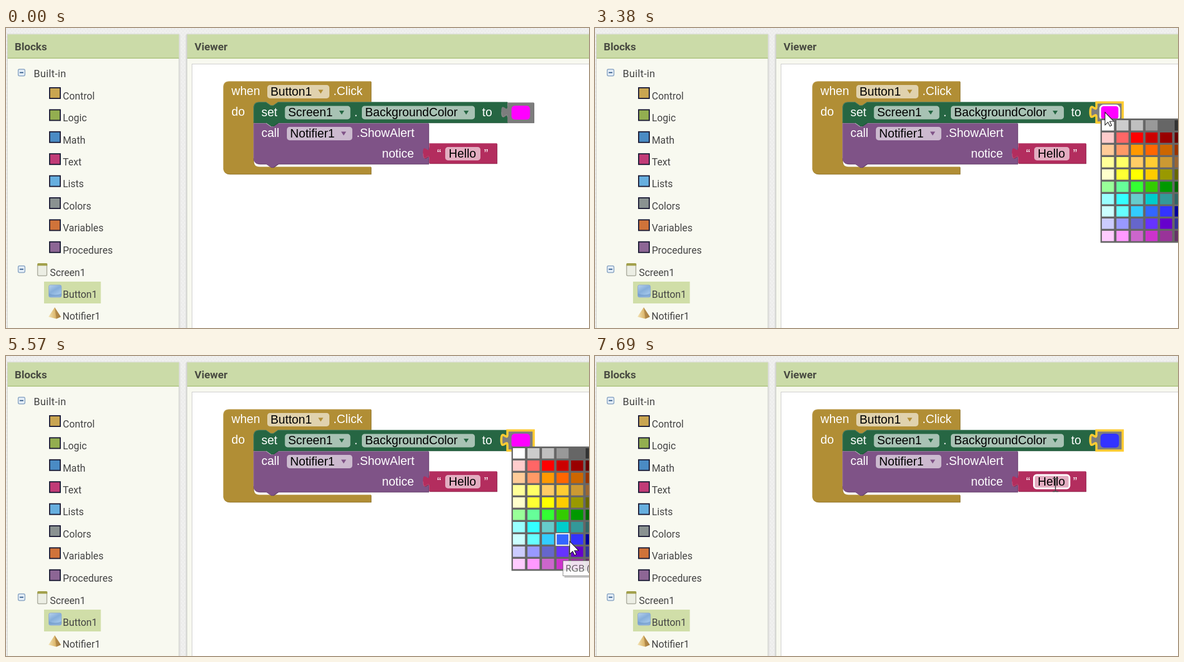
An HTML page that plays this animation: 1042x537 px, repeating every 8 s.

```html
<!DOCTYPE html>
<html lang="en">
<head>
<meta charset="utf-8">
<title>Blocks editor</title>
<style>
  html, body { margin: 0; width: 100%; height: 100%; overflow: hidden; background: #f0f0ee; }
  svg { display: block; width: 100%; height: 100%; }
  text { white-space: pre; }
  .tree { font: 17.6px Roboto, sans-serif; fill: #444; }
  .root { font-size: 18.2px; letter-spacing: .3px; }
  .head { font: bold 19px Roboto, sans-serif; fill: #494b42; }
  .code { font: 21.4px "Liberation Sans", Arial, sans-serif; fill: #fff; }
  .code .dark { fill: #000; }
  .tip { font: 17px "Open Sans", sans-serif; fill: #575757; }
  .light { fill: none; stroke: #fff; stroke-opacity: .2; }
</style>
</head>
<body>
<svg id="stage" viewBox="0 0 1042 537" preserveAspectRatio="none">
  <defs>
    <pattern id="weave" width="6" height="7" patternUnits="userSpaceOnUse">
      <rect width="6" height="7" fill="#f0f0ef"/>
      <path d="M1.5 0v4M4.5 3v4" stroke="#e7e7e6"/>
    </pattern>
    <linearGradient id="glass" x2="0.6" y2="1">
      <stop offset="0" stop-color="#b8d2ee"/><stop offset=".5" stop-color="#86aeda"/><stop offset="1" stop-color="#a9cbed"/>
    </linearGradient>
    <linearGradient id="gold">
      <stop offset="0" stop-color="#f3e3b4"/><stop offset=".55" stop-color="#dcb76c"/><stop offset="1" stop-color="#a97f3c"/>
    </linearGradient>
    <g id="toggle">
      <rect x=".8" y=".8" width="12" height="12" rx="2.5" fill="#e3edf7" stroke="#8ba6c4" stroke-width="1.5"/>
      <path d="M3.5 6.8h6.6" stroke="#3f6591" stroke-width="2"/>
    </g>
  </defs>

  <rect width="1042" height="537" fill="url(#weave)"/>
  <g stroke="#cfd1cb">
    <rect x="2.5" y="11" width="306.5" height="540" fill="#f8f9f0"/>
    <rect x="323.5" y="11" width="740" height="540" fill="#f8f9f0"/>
  </g>
  <path d="M310.5 12V537M322 12V537" stroke="#dcdcda" stroke-width="2"/>
  <path d="M3 11.5H309V54H3zM324 11.5H1042V54H324z" fill="#cbdba8"/>
  <path d="M3 54H309M324 54H1042" stroke="#a9c17a" stroke-width="1.3"/>
  <rect x="332.5" y="64.5" width="730" height="500" fill="#fff" stroke="#ccc"/>
  <g class="head"><text x="15.5" y="40.3">Blocks</text><text x="337" y="40.3">Viewer</text></g>

  <g id="tree" class="tree">
    <rect x="68" y="454" width="101.5" height="39" fill="#d0dea8"/>
    <use href="#toggle" x="21" y="73"/>
    <use href="#toggle" x="21" y="425"/>
    <text class="root" x="49.5" y="87.5">Built-in</text>
    <text x="78.5" y="443.5">Screen1</text>
    <text x="101.5" y="482.5">Button1</text>
    <text x="101" y="521.5">Notifier1</text>
    <rect x="56.5" y="422" width="16.5" height="21.5" rx="2" fill="#eceee4" stroke="#a9aa9c" stroke-width="1.5"/>
    <path d="M56 425.5V423q0-2 2-2H72q2 0 2 2v2.5z" fill="#a2a04b"/>
    <rect x="76.5" y="460" width="22.5" height="22" rx="3" fill="url(#glass)" stroke="#8faacb"/>
    <path d="M77 475q11 5 22 0v4q0 2-2 2H79q-2 0-2-2z" fill="#6f98c9" opacity=".65"/>
    <path d="M87 500L98 517 90 520.5 76 517z" fill="url(#gold)"/>
    <path d="M87 500L90 520.5 98 517z" fill="#a57c40" opacity=".7"/>
  </g>

  <g id="blocks" transform="translate(-.8 -.8)"></g>

  <g id="code" class="code">
    <rect id="color" x="903.5" y="139" width="33" height="25" rx="6"/>
    <rect id="hello" x="785" y="213" width="63" height="24" rx="5" fill="#e3adc1"/>
  </g>
  <rect id="colorRing" x="903" y="138.5" width="34" height="26" rx="6" fill="none" stroke="#fff" stroke-width="3"/>
  <rect id="helloRing" x="784.5" y="213" width="63.5" height="24" rx="5" fill="none" stroke="#fff" stroke-width="3"/>

  <g id="picker">
    <rect x="903.5" y="162" width="184" height="222.5" fill="#666"/>
    <g id="cells"></g>
    <rect id="cellRing" width="23" height="20.5" fill="none" stroke="#fff" stroke-width="2"/>
  </g>
  <g id="tip">
    <path d="M998 369H1060V397H998z" fill="#000" opacity=".25"/>
    <rect x="995.5" y="366.5" width="150" height="27" fill="#fff" stroke="#777"/>
    <text class="tip" x="1000" y="386">RGB (102, 51, 255)</text>
  </g>
  <path id="arrow" d="M.5.8V23.6L5.8 18.6 9.3 25.7 12.4 24.3 9 17.3 16.3 17z" fill="#fff" stroke="#1b1b1b" stroke-width="1.1"/>
  <path id="beam" d="M-5-9h3.5q1.5 0 1.5 1.5 0-1.5 1.5-1.5H5M0-7.500V13M-5 14.500h3.5q1.5 0 1.5-1.5 0 1.5 1.5 1.5H5" fill="none" stroke="#494949" stroke-width="1.7"/>
</svg>

<script>
const $ = id => document.getElementById(id);

function add(parent, tag, attrs, text = '') {
  const el = document.createElementNS('http://www.w3.org/2000/svg', tag);
  for (const k in attrs) el.setAttribute(k, attrs[k]);
  el.textContent = text;
  return parent.appendChild(el);
}

// Toolbox drawers
const drawers = {
  Control: '#c9a551', Logic: '#93ae50', Math: '#4a8bc4', Text: '#c13b77',
  Lists: '#67afdf', Colors: '#8a9291', Variables: '#d0733a', Procedures: '#8d6695'
};
Object.entries(drawers).forEach(([name, fill], i) => {
  const y = 107 + i * 39.4;
  add($('tree'), 'rect', { x: 78, y, width: 19, height: 19, fill, stroke: '#1b1b35', 'stroke-width': 2 });
  add($('tree'), 'text', { x: 101.5, y: y + 20.8 }, name);
});

// Blocks: notch runs left to right, bump right to left, plug is the value tab
const notch = 'l8.5 6h4.5l8.5-6';
const bump = 'l-8.5 6h-4.5l-8.5-6';
const plug = 'c0-13.5-11 11-11-10s11 3.4 11-10';
const colorPath = `M897 134H944V170H897V161${plug}z`;

function block(d, fill, dark, light) {
  add($('blocks'), 'path', { d, fill: dark, transform: 'translate(1 1)' });
  add($('blocks'), 'path', { d, fill });
  add($('blocks'), 'path', { d: light, class: 'light' });
}
block(`M400 96H653V133H487${bump}H454q-11 0-11 11V238q0 11 11 11H653V262H400q-11 0-11-11V107q0-11 11-11z`,
  '#b18e35', '#8e722a', 'M389.5 252V107q0-10.5 10.5-10.5H652M446 246q3 3.5 8 3.5H652');
block(`M454 171H465.5${notch}H756V244H487${bump}H454q-11 0-11-11V171z`,
  '#7f5387', '#66426c', `M443.500 234V171.5H465.5${notch}H755`);
block(`M454 133H465.5${notch}H897V170H487${bump}H443V144q0-11 11-11z`,
  '#266643', '#1e5236', `M443.5 169V144q0-10.5 10.5-10.5H465.5${notch}H896`);
block(colorPath, '#7d7d7d', '#646464', 'M897.5 141V134.5H943M897 160.5c0-13-10.5 11-10.5-9');
block(`M757 207H878V243H757V235${plug}z`, '#b32d5e', '#8f244b',
  'M757.5 214V207.5H877M757 234.5c0-13-10.5 11-10.5-9');
const outline = add($('blocks'), 'path', {
  d: colorPath, fill: 'none', stroke: '#fc3', 'stroke-width': 4, 'stroke-linejoin': 'miter'
});

function label(x, y, str, cls = '') {
  add($('code'), 'text', { x, y, class: cls }, str);
}
function dropdown(x, y, w, str, fill, arrow) {
  add($('code'), 'rect', { x, y, width: w, height: 24, rx: 5, fill });
  label(x + 5.8, y + 18.6, str, 'dark');
  add($('code'), 'path', { d: `M${x + w - 20} ${y + 8.5}h9l-4.5 7z`, fill: arrow });
}
dropdown(467, 102, 111, 'Button1', '#e0d2ae', '#b18e35');
dropdown(498.5, 139.5, 117, 'Screen1', '#a8c2b4', '#266643');
dropdown(636, 139.5, 202, 'BackgroundColor', '#a8c2b4', '#266643');
dropdown(502, 177, 117, 'Notifier1', '#ccbacf', '#7f5387');
label(403, 120.3, 'when');
label(585, 120.3, '.Click');
label(403, 157, 'do');
label(456.5, 158, 'set');
label(622.5, 158, '.');
label(851, 158, 'to');
label(456.5, 195.3, 'call');
label(626.5, 195.3, '.ShowAlert');
label(672, 231.8, 'notice');
label(770.5, 231.8, '“');
label(854.5, 231.8, '”');
label(791.3, 231.8, 'Hello', 'dark');

// Colour picker
const palette = [
  'fff ccc c0c0c0 999 666 333', 'fcc f66 f00 c00 900 600', 'fc9 f96 f90 f60 c60 930',
  'ff9 ff6 fc6 fc3 c93 963', 'ffc ff3 ff0 fc0 990 660', '9f9 6f9 3f3 3c0 090 060',
  '9ff 3ff 6cc 0cc 399 366', 'cff 6ff 3cf 36f 33f 009', 'ccf 99f 66c 63f 60c 339',
  'fcf f9f c6c c3c 939 636'
];
palette.forEach((row, r) => row.split(' ').forEach((hex, c) =>
  add($('cells'), 'rect', { x: 906 + c * 26, y: 165 + r * 22, width: 21.5, height: 18.5, fill: '#' + hex })));

// Pointer: [start ms, first points], one point every 80 ms, then it rests
const moves = [
  [640, [915, 514], [866, 382], [850, 332]],
  [1810, [850.5, 304.5], [848, 264], [862, 212], [890, 168], [905, 150]],
  [2520, [907, 150], [910, 150]],
  [2750, [911, 150]],
  [4310, [914, 159], [926, 188], [948, 238], [969, 290], [983, 325], [990, 341], [991, 344]],
  [5410, [994, 342], [1001, 336], [1007, 331], [1009, 331], [1010, 331]],
  [5900, [1013, 331]],
  [7060, [1004, 326], [974, 309], [932, 283], [892, 258], [860, 240], [841, 232], [831, 229], [825, 228], [823, 228]]
];
const OPEN = 3380, CLOSE = 6430, LOOP = 8000;

function pointer(t) {
  const move = moves.findLast(m => m[0] <= t);
  if (!move) return null;
  const [start, ...points] = move;
  // The last step may fall a little short of its 80 ms
  return points[Math.min(points.length - 1, Math.floor((t - start + 20) / 80))];
}

function tipAlpha(t) {
  if (t < 5090 || t >= 5810) return 0;
  const step = Math.floor((t - 5090) / 80);
  return step < 6 ? Math.min(1, (step + 1) / 4) : [.85, .5, .25][step - 6];
}

const show = (el, on) => el.setAttribute('visibility', on ? 'visible' : 'hidden');

function render(t) {
  const p = pointer(t);
  const [x, y] = p || [-99, -99];
  const inside = (x0, y0, x1, y1) => x >= x0 && x < x1 && y >= y0 && y < y1;
  const open = t >= OPEN && t < CLOSE;
  const overText = inside(785, 213, 848, 237);
  const overCells = open && inside(904, 163, 1042, 383);

  show(outline, t >= OPEN);
  show($('picker'), open);
  $('color').setAttribute('fill', t < CLOSE ? '#f0f' : '#33f');
  show($('colorRing'), inside(903, 139, 937, 163));
  show($('helloRing'), overText);
  show($('cellRing'), overCells);
  if (overCells) {
    $('cellRing').setAttribute('x', 905.3 + Math.floor((x - 904) / 26) * 26);
    $('cellRing').setAttribute('y', 164.2 + Math.floor((y - 163) / 22) * 22);
  }
  $('tip').setAttribute('opacity', tipAlpha(t));

  show($('arrow'), p && !overText);
  show($('beam'), overText);
  for (const id of ['arrow', 'beam']) $(id).setAttribute('transform', `translate(${x} ${y})`);
}

const begin = performance.now();
function tick() {
  render((performance.now() - begin) % LOOP);
  requestAnimationFrame(tick);
}
tick();
</script>
</body>
</html>
```
